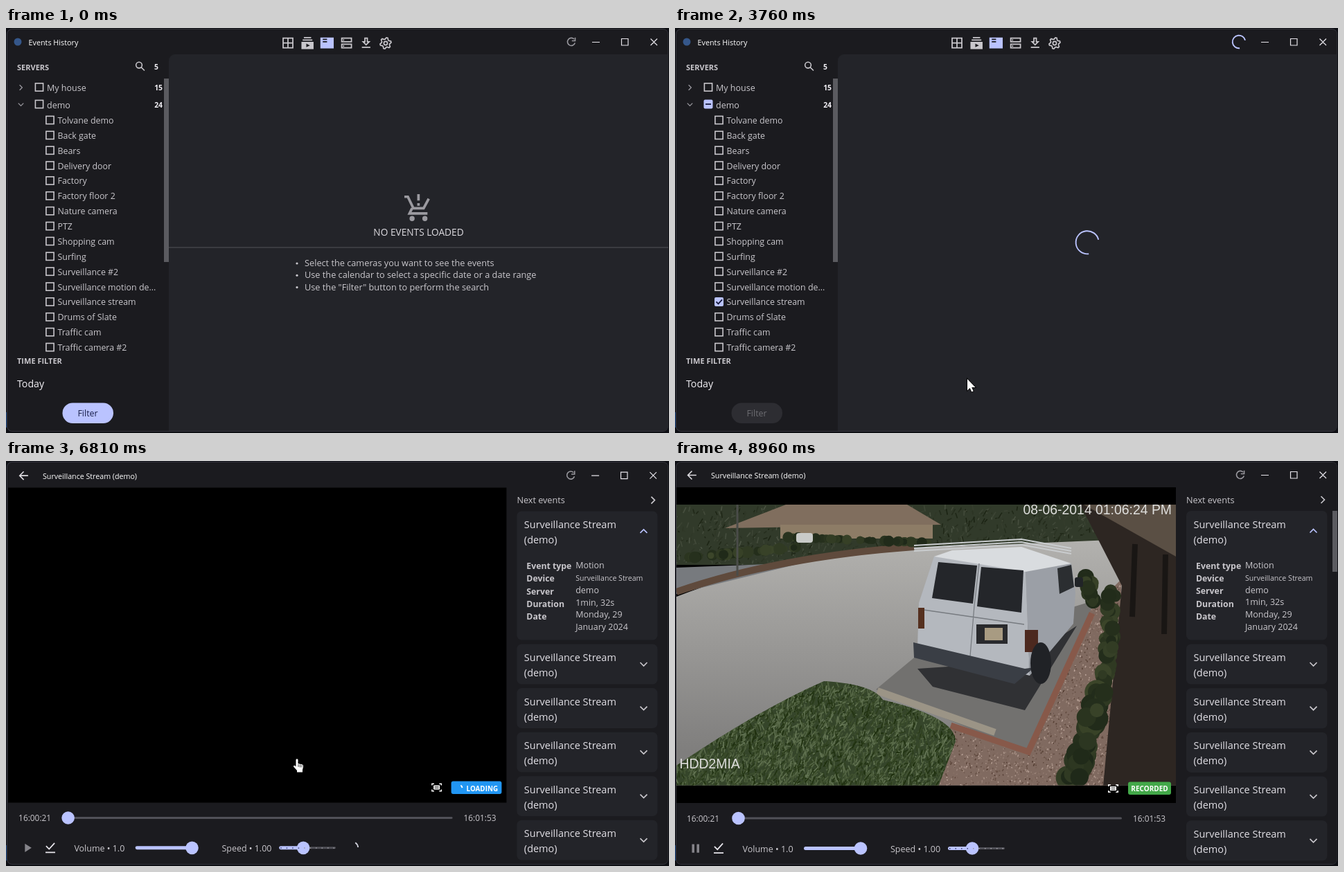
An HTML page with a canvas for the animation above (9210 ms loop, 957 by 585 pixels).

```html
<!DOCTYPE html>
<html lang="en">
<head>
<meta charset="utf-8">
<title>Events History</title>
<style>
  html, body { margin: 0; width: 100%; height: 100%; overflow: hidden; background: #0e0f14; }
  canvas { display: block; }
</style>
</head>
<body>
<canvas id="stage" width="957" height="585"></canvas>
<script>
const LOOP = 9210;
const CHECKED = 1940, SEARCH = 3040, LOADED = 5080, RIPPLE = 6450, OPEN = 6740, VIDEO = 7130;
const BG = '#1b1b1f', PANEL = '#232429', ACCENT = '#bac3ff', TEXT = '#c9c7cc';
const GRAY = '#9b9aa0', WHITE = '#f2f0f5', BAR = '#5b5b60';

const stage = document.getElementById('stage').getContext('2d');
let ctx = stage;

// Icons on a 24 unit grid
const FILLED = {
  subs: 'M4 6h16v2H4zM6 2h12v2H6zM2 10h20v12H2zM10 13v6l6-3z',
  list: 'M1 3h22v18H1zM5 5h7v2H5zM5 9h7v2H5z',
  warning: 'M1 21h22L12 2zM11 16h2v2h-2zM11 10h2v4h-2z',
  camera: 'M3 6h14v4l4-4v12l-4-4v4H3z',
  timer: 'M9 1h6v2H9zM12 4a9 9 0 1 0 .1 0zM11 8h2v6h-2z',
  bang: 'M10 3h4v12h-4zM10 17h4v4h-4z',
  play: 'M8 5v14l11-7z',
  pause: 'M6 5h4v14H6zM14 5h4v14h-4z'
};
const STROKED = {
  grid: 'M4 4h16v16H4zM12 4v16M4 12h16',
  dns: 'M4 4h16v6H4zM4 14h16v6H4zM6 7h2M6 17h2',
  download: 'M10 4h4v6h3l-5 5-5-5h3zM5 19h14',
  refresh: 'M18.7 14A7 7 0 1 1 17 7M19 4v6h-6',
  search: 'M15 9.5a5.5 5.5 0 1 0-11 0 5.5 5.5 0 1 0 11 0zM13.5 13.5l6 6',
  cart: 'M1 3h2.7l4.3 9h8l4-7.5M7 12l-2 4h14M12 1v5M12 8v2M8 20a1 1 0 1 0-2 0 1 1 0 1 0 2 0zM18 20a1 1 0 1 0-2 0 1 1 0 1 0 2 0z',
  calendar: 'M3 5h18v17H3zM3 7h18M6 1v4M18 1v4',
  fit: 'M17 5h4v3M7 5H3v3M17 19h4v-3M7 19H3v-3M7 9h10v6H7zM8 12h8',
  done: 'M5 9.5l5 5 9-10M4 20h16',
  back: 'M20 12H5M12 4.5L4.5 12l7.5 7.5',
  right: 'M9 6l6 6-6 6', down: 'M6 9l6 6 6-6', up: 'M6 15l6-6 6 6'
};
const ARROW = 'M0 0V16.5L3.7 13 6.2 18.5 8.7 17.4 6.2 12H11.5z';
const HAND = 'M-1.5 1.5Q0-1 1.5 1.5V7L8 8.500Q9.5 9 9 12L8 16V19.500H0V17L-5 11.500Q-5 9-2.700 10.300L-1.500 11.500z';

const clamp = v => Math.max(0, Math.min(1, v));
const mix = (a, b, k) => `rgb(${a.map((v, i) => Math.round(v + (b[i] - v) * k))})`;
const smooth = k => k * k * (3 - 2 * k);

function rect(x, y, w, h, color, r = 0) {
  ctx.fillStyle = color;
  ctx.beginPath();
  ctx.roundRect(x, y, w, h, r);
  ctx.fill();
}
function circle(x, y, r, color) {
  ctx.fillStyle = color;
  ctx.beginPath();
  ctx.arc(x, y, r, 0, 7);
  ctx.fill();
}
function fill(color, d) {
  const path = new Path2D(`M${d}z`);
  ctx.fillStyle = color;
  ctx.fill(path);
  return path;
}
function line(color, width, d) {
  ctx.strokeStyle = color;
  ctx.lineWidth = width;
  ctx.stroke(new Path2D('M' + d));
}
function text(s, x, y, size = 12.5, color = TEXT, weight = 400, align = 'left') {
  ctx.font = `${weight} ${size}px "Open Sans", sans-serif`;
  ctx.fillStyle = color;
  ctx.textAlign = align;
  ctx.fillText(s, x, y);
}
const bold = (s, x, y, size = 11, color = TEXT, align) => text(s, x, y, size, color, 700, align);

function icon(name, x, y, size, color) {
  ctx.save();
  ctx.translate(x - size / 2, y - size / 2);
  ctx.scale(size / 24, size / 24);
  ctx.fillStyle = ctx.strokeStyle = color;
  ctx.lineWidth = 2;
  if (FILLED[name]) ctx.fill(new Path2D(FILLED[name]), 'evenodd');
  else ctx.stroke(new Path2D(STROKED[name]));
  ctx.restore();
}
function gear(x, y) {
  ctx.strokeStyle = TEXT;
  ctx.lineWidth = 1.7;
  ctx.beginPath();
  for (let i = 0; i < 24; i++) {
    const a = (i + .5) * Math.PI / 12, r = i % 4 < 2 ? 5.9 : 8.1;
    ctx.lineTo(x + r * Math.cos(a), y + r * Math.sin(a));
  }
  ctx.closePath();
  ctx.moveTo(x + 2.6, y);
  ctx.arc(x, y, 2.6, 0, 7);
  ctx.stroke();
}

// Indeterminate ring: head leads, tail follows, while the whole arc rotates.
function spinner(x, y, r, ms, color = ACCENT) {
  const p = ms / 1333 % 1, turn = Math.PI * 2;
  const ease = v => { const k = clamp(v); return 1 - (1 - k) ** 2.6 * (1 + 2.6 * k); };
  const head = ease(p * 2), tail = ease(p * 2 - 1);
  const start = turn * (-.25 + tail * .75 + ms / 2222 + p / 4);
  ctx.strokeStyle = color;
  ctx.lineWidth = 1.9;
  ctx.beginPath();
  ctx.arc(x, y, r, start, start + Math.max(.01, (head - tail) * turn * .75));
  ctx.stroke();
}

function windowFrame() {
  rect(0, 0, 957, 585, '#0e0f14');
  rect(0, 555, 2, 22, '#123d78');
  rect(1, 1, 955, 582, '#34343d', 8);
  rect(2, 2, 953.5, 580, BG, 7);
}
function windowButtons() {
  line('#e6e4ea', 1.2, '846 20.5h11M888.5 15.5h9.5v9.5h-9.5zM930.5 15.5l9.5 9.5M940 15.5l-9.5 9.5');
}
function checkbox(x, y, mark) {
  if (!mark) {
    ctx.strokeStyle = TEXT;
    ctx.lineWidth = 1.6;
    ctx.strokeRect(x - 5.6, y - 5.6, 11.2, 11.2);
    return;
  }
  rect(x - 6.5, y - 6.5, 13, 13, ACCENT, 2);
  line('#14183a', 1.8, `${x - 4} ${y}` + (mark === 'dash' ? 'h8' : 'l3 3 5.5-6'));
}

const cameras = ['Tolvane demo', 'Back gate', 'Bears', 'Delivery door', 'Factory', 'Factory floor 2', 'Nature camera', 'PTZ',
  'Shopping cam', 'Surfing', 'Surveillance #2', 'Surveillance motion de...', 'Surveillance stream', 'Drums of Slate',
  'Traffic cam', 'Traffic camera #2'];

function sidebar(t) {
  const on = t >= CHECKED;
  bold('SERVERS', 16, 61);
  icon('search', 194, 55.5, 19, TEXT);
  bold('5', 220, 60, 10.4, WHITE, 'right');
  icon('right', 21.5, 86, 15, GRAY);
  checkbox(48, 85.5);
  text('My house', 59, 91);
  bold('15', 226, 90, 10.4, WHITE, 'right');
  icon('down', 21.5, 110.5, 15, GRAY);
  checkbox(48, 110, on && 'dash');
  text('demo', 59, 115.5);
  bold('24', 226, 115, 10.4, WHITE, 'right');
  cameras.forEach((name, i) => {
    const y = 133 + i * 21.87;
    checkbox(63.5, y, on && name === 'Surveillance stream' && 'check');
    text(name, 74.5, y + 5, 12.4);
  });
  rect(228, 73, 7, 265, BAR);
  bold('TIME FILTER', 16, 485);
  text('Today', 16, 518.5, 14.2, WHITE);
  const off = clamp((t - SEARCH) / 200) - clamp((t - LOADED) / 200);
  rect(81.5, 541.5, 73.5, 29.5, mix([186, 195, 255], [45, 45, 50], off), 14.75);
  text('Filter', 118, 561, 12.4, mix([24, 30, 72], [110, 110, 115], off), 500, 'center');
}

function emptyMessage() {
  icon('cart', 595.4, 260.4, 44.4, GRAY);
  text('NO EVENTS LOADED', 595.5, 300, 13.7, '#dddbe0', 400, 'center');
  rect(235, 316.5, 721, 1, '#55555b');
  ['Select the cameras you want to see the events', 'Use the calendar to select a specific date or a date range',
    'Use the "Filter" button to perform the search'].forEach((s, i) => {
    circle(420, 340 + i * 17.3, 1.6, TEXT);
    text(s, 431, 344 + i * 17.3, 12.75);
  });
}

const headings = [['dns', 'Server'], ['camera', 'Device'], ['subs', 'Event'], ['timer', 'Duration'], ['bang', 'Priority'], ['calendar', 'Date']];
const durations = ['51s', '1min, 1s', '21s', '21s', '41s', '20s', '20s', '1min, 32s', '21s', '21s', '21s'];
const times = '16:05 16:04 16:03 16:03 16:02 16:01 16:01 16:01 16:00 16:00 15:59'.split(' ');

function table(t) {
  rect(246, 49.5, 699.5, 34.5, BG, 7);
  bold('87', 277.5, 71, 11, WHITE, 'center');
  headings.forEach(([name, label], i) => {
    const x = i ? 402 + i * 79.5 : 323;
    icon(name, x - 11.3, 67, 13, GRAY);
    text(label, x, 71, 10.4);
  });
  durations.forEach((duration, i) => {
    const y = 117.5 + i * 43.75, motion = duration === '1min, 32s';
    if (motion) icon('done', 269.5, y - 1, 21, '#e2e0e6');
    else icon('warning', 271.5, y - .5, 21, '#ffc107');
    const cells = ['demo', ['Surveillance', 'Stream'], motion ? 'Motion' : 'Not found', duration,
      motion ? 'Warning' : 'Alarm', ['Monday, 29 January 2024', times[i]]];
    cells.forEach((cell, c) => {
      const x = c ? 380 + c * 81 : 299;
      if (typeof cell === 'string') text(cell, x, y + 4.5);
      else cell.forEach((s, row) => text(s, x, y - 4.5 + row * 18));
    });
  });
  ctx.globalAlpha = clamp((t - LOADED) / 240);
  rect(949, 39, 7, 87, BAR);
  ctx.globalAlpha = 1;
  if (t < RIPPLE) return;
  ctx.save();
  ctx.beginPath();
  ctx.rect(235, 401.5, 714, 43.5);
  ctx.clip();
  circle(420, 430, 360 * clamp((t - RIPPLE) / 150), 'rgba(255,255,255,.07)');
  ctx.restore();
}

function eventsPage(t) {
  const loading = t >= SEARCH && t < LOADED;
  circle(17, 20, 5.5, '#35578a');
  text('Events History', 32.5, 25, 10.8, '#fff');
  ['grid', 'subs', 'list', 'dns', 'download'].forEach((name, i) =>
    icon(name, 407 + i * 28.2, 21.7, 21, name === 'list' ? ACCENT : TEXT));
  gear(548, 22);
  windowButtons();
  sidebar(t);
  rect(235, 38, 720.5, 544, PANEL, [9, 0, 7, 0]);
  if (loading) {
    spinner(814, 20, 9.3, t - SEARCH);
    spinner(595.2, 309.8, 16.6, t - SEARCH);
  } else icon('refresh', 816, 20, 19, GRAY);
  if (t < SEARCH) emptyMessage();
  else if (!loading) table(t);
}

// The recorded view: flat tones with seeded texture
function makeScene() {
  const canvas = document.createElement('canvas');
  canvas.width = 957;
  canvas.height = 585;
  ctx = canvas.getContext('2d');
  let seed = 7;
  const random = () => (seed = seed * 16807 % 2147483647) / 2147483647;
  const texture = (path, [x, y, w, h], count, length, base, spread) => {
    ctx.save();
    ctx.clip(path);
    for (let i = 0; i < count; i++) {
      const shade = (random() - .5) * spread, color = `rgb(${base.map(v => v + shade)})`;
      line(color, 1.6, `${x + random() * w} ${y + random() * h}l${(random() - .3) * length} ${-random() * length}`);
    }
    ctx.restore();
  };
  const shrubs = (x0, y0, x1, y1, count, size) => {
    for (let i = 0; i < count; i++) {
      const k = random(), r = size * (.5 + random() / 2), g = random() * 30;
      circle(x0 + (x1 - x0) * k + (random() - .5) * size, y0 + (y1 - y0) * k, r, `rgb(${30 + g},${40 + g},${24 + g * .6})`);
    }
  };

  ctx.beginPath();
  ctx.rect(2, 63, 721, 405.5);
  ctx.clip();
  const trees = fill('#313a2a', '2 63H723V150H2');
  texture(trees, [2, 70, 721, 80], 1200, 9, [52, 60, 44], 50);
  fill('#806e5e', '72 97L160 63H335L384 92');
  rect(152, 92, 220, 20, '#8d7c66');
  const asphalt = ctx.createLinearGradient(0, 110, 0, 420);
  asphalt.addColorStop(0, '#b3b2af');
  asphalt.addColorStop(1, '#7f7e7d');
  fill(asphalt, '2 196Q150 138 345 126L723 110V470H2');
  fill('#777a7e', '2 154L185 147 2 192');
  line('#5f4a3c', 10, '2 189Q150 138 345 124');
  shrubs(15, 140, 175, 125, 45, 9);
  shrubs(160, 110, 370, 118, 45, 8);
  rect(175, 104, 24, 14, '#c9cbc9', 4);
  line('#4a4c49', 3, '90 63V166');

  fill('#72716f', '290 330L350 280 610 200 510 422');
  const gravel = fill('#806a60', '375 470L400 383 508 421 600 215 645 170 630 470');
  texture(gravel, [375, 170, 270, 300], 4500, 3, [134, 112, 101], 110);
  line('#87594a', 9, '398 382L510 420 602 220');
  line('#9b9486', 10, '292 332L462 392');
  fill('#2d2622', '585 63H723V470H618L645 180');
  fill('#5a4f44', '590 63H723V138');
  line('#191614', 8, '664 120L660 225M708 135L706 250');
  shrubs(632, 185, 622, 320, 50, 13);
  shrubs(615, 330, 575, 460, 60, 18);
  shrubs(595, 165, 600, 205, 24, 12);

  // Parked van
  fill('#303134', '350 300L372 326 505 360 580 238 500 290');
  fill('#b4b8be', '374 138L506 158 512 310 350 268 352 205');
  fill('#9b9fa6', '506 158L572 148 578 190 575 235 512 310');
  fill('#d9dcdf', '374 138L400 129 500 124 572 148 506 160');
  fill('#24262a', '380 146L436 151 430 206 371 198');
  fill('#24262a', '442 153L503 158 500 219 436 210');
  fill('#2b2e31', '552 155L572 150 576 182 555 192');
  line('#777b80', 1.3, '439 148L432 209 426 282M352 214L504 236');
  fill('#3a3e45', '344 262L505 300 519 298 490 322 345 284');
  rect(435, 236, 45, 28, '#292a2d');
  rect(447, 241, 26, 18, '#a89b82');
  rect(351, 212, 9, 30, '#55301f');
  rect(505, 244, 19, 32, '#4c291f');
  rect(577, 168, 12, 14, '#212427', 3);
  ctx.save();
  ctx.translate(528, 292);
  ctx.scale(.5, 1);
  circle(0, 0, 30, '#202226');
  ctx.restore();
  for (let i = 0; i < 3; i++) line('#c9ccce', 2, `345 ${122 + i * 4}L500 ${113 + i * 4} 572 ${126 + i * 4}`);

  const bush = fill('#35452a', '2 440Q120 360 215 318Q285 322 300 345Q405 370 405 405L380 470H2');
  texture(bush, [2, 325, 404, 150], 5000, 12, [66, 83, 50], 75);
  ctx = stage;
  return canvas;
}
const scene = makeScene();

function overlayText(s, x, y, align) {
  ctx.font = '19.4px "Liberation Sans", Arial, sans-serif';
  ctx.textAlign = align;
  ctx.fillStyle = '#dededc';
  ctx.fillText(s, x, y);
}
function slider(x, end, thumb, y, width) {
  rect(x, y - 1.5, end - x, 3, '#515158', 1.5);
  rect(x, y - width / 2, thumb - x, width, ACCENT, width / 2);
  circle(thumb, y, 9.3, ACCENT);
}

function video(t) {
  rect(2, 38, 721, 456, '#000');
  if (t < VIDEO) {
    icon('fit', 622, 472, 18, '#fff');
    rect(643, 463, 73, 18.5, '#2196f3', 3);
    spinner(654, 473, 5, t - 6660, '#fff');
    bold('LOADING', 665, 477, 9.9, '#fff');
    return;
  }
  ctx.drawImage(scene, 0, 0);
  overlayText(`08-06-2014 01:06:${t < 8090 ? 23 : 24} PM`, 717, 76.5, 'right');
  overlayText('HDD2MIA', 6.5, 444, 'left');
  icon('fit', 632.5, 473, 18, '#fff');
  rect(654, 463.5, 62, 18.5, mix([33, 150, 243], [67, 168, 73], clamp((t - VIDEO) / 320)), 3);
  bold('RECORDED', 685, 477, 10, '#fff', 'center');
}

function controls(t) {
  text('16:00:21', 17, 521, 11.9);
  slider(89, 645, 88.7 + 2.8 * clamp((t - 7900) / 800), 516, 3.5);
  text('16:01:53', 708, 521, 11.9, TEXT, 400, 'right');
  icon(t < VIDEO ? 'play' : 'pause', 29.7, 559.5, 21, '#85848a');
  icon('done', 63, 559, 21, '#e8e6ec');
  text('Volume • 1.0', 97.5, 565);
  slider(186, 268, 268, 559.5, 5);
  text('Speed • 1.00', 311, 565);
  slider(394, 476, 429, 559.5, 5);
  for (let x = 396; x < 476; x += 8.5) rect(x, 559, 1.5, 1.5, x < 429 ? '#3c4370' : GRAY);
  if (t < 8020) spinner(499, 559.5, 9.3, t - 6660, '#cfd0da');
}

function nextEvents(t) {
  text('Next events', 738, 60.5, 12.7);
  icon('right', 935, 56, 20, TEXT);
  for (let i = 0; i < 6; i++) {
    const y = i ? 200.8 + i * 63.7 : 72;
    rect(738, y, 203.5, i ? 58 : 186.5, PANEL, 7);
    text('Surveillance Stream', 748.5, y + 24.5, 14.5, '#e2e0e6');
    text('(demo)', 748.5, y + 46.5, 14.5, '#e2e0e6');
    icon(i ? 'down' : 'up', 921.5, y + 29, 20, i ? TEXT : ACCENT);
  }
  ['Event type', 'Device', 'Server', 'Duration', 'Date'].forEach((s, i) => bold(s, 752, 156 + i * 18.2, 12.3));
  ['Motion', 'Surveillance Stream', 'demo', '1min, 32s', 'Monday, 29', 'January 2024'].forEach((s, i) =>
    text(s, 823, 155 + i * 17.8, s.length > 15 ? 10.6 : 12.5));
  ctx.globalAlpha *= clamp((t - 6830) / 150);
  rect(949, 72, 7, 88, BAR);
}

function playerPage(t) {
  rect(2, 2, 953.5, 580, BG, 7);
  icon('back', 24.5, 20.5, 19, '#dddbe0');
  text('Surveillance Stream (demo)', 52, 25, 10.7, '#fff');
  icon('refresh', 816, 20, 19, GRAY);
  windowButtons();
  video(t);
  controls(t);
  nextEvents(t);
}

// Pointer visits: where it enters, then moves as [start, end, x, y]
const visits = [
  { x: 845, y: 575, moves: [[400, 520, 607, 539], [730, 860, 306, 422], [1040, 1340, 118, 551], [1340, 1690, 150, 391],
    [1910, 2210, 205, 585]] },
  { x: 205, y: 583, moves: [[2550, 2950, 140, 563], [3450, 3750, 422, 507], [4410, 4700, 426, 502], [5780, 5980, 275, 446],
    [5980, 6260, 420, 430], [8120, 8560, 485, 586]] }
];
function pointer(t) {
  const visit = visits.find(v => t >= v.moves[0][0] && t < v.moves.at(-1)[1]);
  if (!visit) return;
  let { x, y } = visit;
  for (const [start, end, toX, toY] of visit.moves) {
    const k = smooth(clamp((t - start) / (end - start)));
    x += (toX - x) * k;
    y += (toY - y) * k;
  }
  const hand = t > 1270 && t < 1980 || t > 2780 && t < SEARCH || t > 5790;
  const path = new Path2D(hand ? HAND : ARROW);
  ctx.save();
  ctx.translate(x, y);
  ctx.lineWidth = 1.6;
  ctx.strokeStyle = '#000';
  ctx.stroke(path);
  ctx.fillStyle = '#fff';
  ctx.fill(path);
  if (hand) line('#000', .8, '2 8v4M4.5 8.5v4M7 9v3.5');
  ctx.restore();
}

function draw(t) {
  const k = clamp((t - OPEN) / 200), opening = t >= OPEN + 40;
  windowFrame();
  if (k < .35) eventsPage(t);
  if (opening) {
    const scale = 1 - .08 * (1 - k) ** 8;
    ctx.save();
    ctx.globalAlpha = clamp(k * 2.9);
    ctx.translate(478.5, 292);
    ctx.scale(scale, scale);
    ctx.translate(-478.5, -292);
    playerPage(t);
    ctx.restore();
  }
  pointer(t);
}

const begin = performance.now();
function tick() {
  draw((performance.now() - begin) % LOOP);
  requestAnimationFrame(tick);
}
tick();
</script>
</body>
</html>
```
